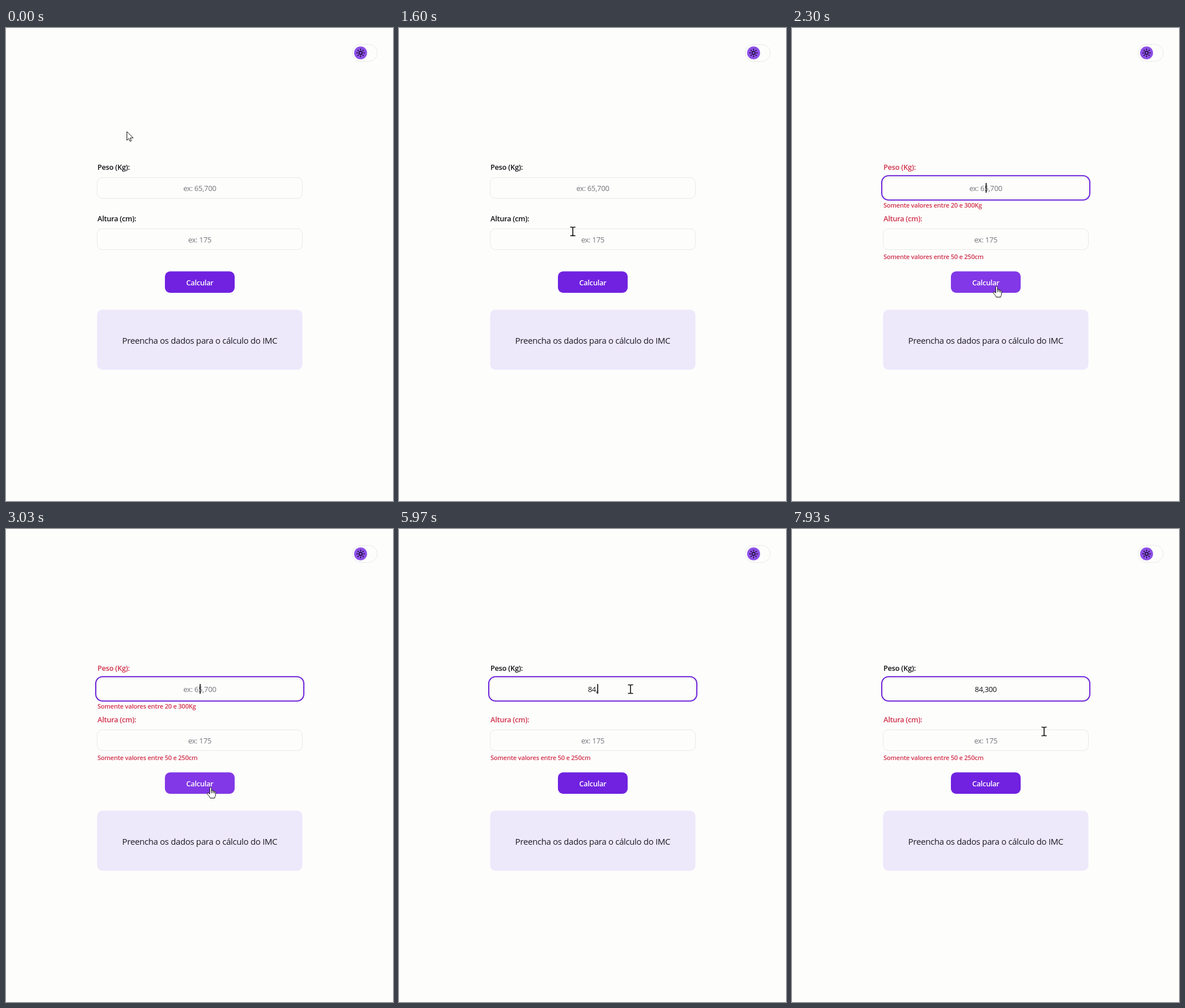
An HTML page that plays this animation: 677 px wide and 827 px high, repeating every 8 s.

```html
<!DOCTYPE html>
<html lang="pt">
<head>
<meta charset="utf-8">
<title>IMC</title>
<style>
  html, body { margin: 0; width: 100%; height: 100%; overflow: hidden; background: #fdfdfc; }
  svg { display: block; }
  text { font: 12.85px "Open Sans", "Noto Sans", sans-serif; letter-spacing: -0.02em; fill: #101014; }
  .label, .error, .action { font-weight: 600; }
  .label, .action { font-size: 12.7px; }
  .error { font-size: 11px; }
  .error, .label.invalid { fill: #d0314b; }
  .middle { text-anchor: middle; }
  .hint { fill: #74747b; }
  .message { font-size: 14.8px; fill: #1a1a22; }
  .action { fill: #fff; }
  .box { fill: #fdfdfc; stroke: #e9e9e6; }
  .pointer { fill: #fff; stroke: #111; stroke-linejoin: round; stroke-linecap: round; }
</style>
</head>
<body>
<svg width="677" height="827" viewBox="0 0 677 827">
  <rect class="box" x="605.5" y="28.5" width="44" height="30" rx="15"/>
  <circle cx="620.3" cy="43.5" r="11.3" fill="#8c4fe6"/>
  <g id="sun" transform="translate(620.3 43.5)" fill="none" stroke="#0c0818" stroke-width="1.4" stroke-linecap="round">
    <circle r="2.8"/>
  </g>

  <text id="weightLabel" class="label" x="160" y="248">Peso (Kg):</text>
  <rect class="box" x="159.5" y="261.5" width="359" height="36.5" rx="9"/>
  <rect id="ring" x="157" y="258.2" width="364" height="42.6" rx="12" fill="none" stroke="#6d23da" stroke-width="2"/>
  <text id="weight" class="middle" x="339" y="285"></text>
  <rect id="caret" y="271" width="1.6" height="17"/>
  <text id="weightError" class="error" x="160" y="314.3">Somente valores entre 20 e 300Kg</text>

  <text id="heightLabel" class="label" x="160" y="338">Altura (cm):</text>
  <rect class="box" x="159.5" y="351" width="359" height="36.5" rx="9"/>
  <text class="middle hint" x="339" y="375">ex: 175</text>
  <text id="heightError" class="error" x="160" y="404.3">Somente valores entre 50 e 250cm</text>

  <rect id="button" x="278" y="425.5" width="122" height="37.5" rx="9"/>
  <text class="middle action" x="339" y="449.5">Calcular</text>
  <rect x="159.5" y="492.5" width="359" height="105" rx="9" fill="#eee8fb"/>
  <text class="middle message" x="339" y="551.5">Preencha os dados para o cálculo do IMC</text>

  <g id="cursor">
    <path id="arrow" class="pointer" d="M.5 .5V15.3L3.9 12.1 6.1 17.2 8.4 16.2 6.2 11.2H11.1Z"/>
    <path id="hand" class="pointer" d="M-1.6 12V2.2C-1.6 .2 1.4 .2 1.4 2.2V7.5 6.6C1.8 5.3 4 5.6 4.1 7V8 7.5C4.5 6.4 6.4 6.7 6.5 8V9 8.5C7 7.6 8.7 8 8.7 9.3V13.5C8.7 15.8 7.3 16.8 7 19.5H-.8C-1.3 16.8-4.6 14.6-6 11.8-6.4 10.4-4.4 9.9-3.4 10.7ZM1.4 7.5V10.5M4.1 8V10.5M6.5 9V11"/>
    <path id="beam" d="M-4.5-7.5H-1.5Q0-7.5 0-6Q0-7.5 1.5-7.5H4.5M0-6V6M-4.5 7.5H-1.5Q0 7.5 0 6Q0 7.5 1.5 7.5H4.5" fill="none" stroke="#111" stroke-width="1.6"/>
  </g>
</svg>
<script>
const LOOP = 8000;
const el = id => document.getElementById(id);
const show = (id, on) => { el(id).style.display = on ? '' : 'none'; };
const clamp = v => Math.min(1, Math.max(0, v));
const progress = (t, from, to) => clamp((t - from) / (to - from));
const lerp = (a, b, k) => a + (b - a) * k;
const smooth = k => k * k * (3 - 2 * k);

// time, x, y of the pointer hotspot
const path = [
  [0, 211, 181], [1200, 211, 181], [1880, 358, 457], [1920, 358, 457], [2000, 358, 451],
  [3690, 358, 451], [3750, 405, 280], [7929, 405, 280], [7930, 441, 354], [LOOP, 441, 354]
];
const typing = [[5970, '84,'], [6570, '84,3'], [6900, '84,30'], [6970, '84,300']];

for (let i = 0; i < 8; i++) {
  const ray = document.createElementNS('http://www.w3.org/2000/svg', 'path');
  ray.setAttribute('d', 'M0-5.3V-6.7');
  ray.setAttribute('transform', `rotate(${i * 45})`);
  el('sun').append(ray);
}

function pointerAt(t) {
  const i = path.findIndex(p => p[0] > t);
  const [t0, x0, y0] = path[i - 1], [t1, x1, y1] = path[i];
  const k = smooth(progress(t, t0, t1));
  return [lerp(x0, x1, k), lerp(y0, y1, k)];
}

function pointerShape(x, y) {
  const inside = (l, t, r, b) => x >= l && x <= r && y >= t && y <= b;
  if (inside(278, 425, 400, 463)) return 'hand';
  if (inside(159, 261, 519, 298) || inside(159, 350, 519, 388)) return 'beam';
  return 'arrow';
}

function render(t) {
  const submitted = t >= 2300;
  const typed = typing.reduce((text, [at, value]) => t >= at ? value : text, '');
  const weightInvalid = submitted && !typed;

  const weight = el('weight');
  const content = typed || 'ex: 65,700';
  if (weight.textContent !== content) weight.textContent = content;
  weight.classList.toggle('hint', !typed);
  el('caret').setAttribute('x', 338.8 + (typed ? weight.getComputedTextLength() / 2 - 0.6 : 0));

  show('ring', submitted);
  show('caret', submitted && t < 5170 || t >= 5970 && t < 7030);
  show('weightError', weightInvalid);
  show('heightError', submitted);
  el('weightLabel').classList.toggle('invalid', weightInvalid);
  el('heightLabel').classList.toggle('invalid', submitted);

  const hover = progress(t, 1880, 2030) - progress(t, 3700, 3770);
  const [r, g, b] = [[112, 34, 224], [130, 56, 230]][0].map((c, i) => lerp(c, [130, 56, 230][i], hover));
  el('button').setAttribute('fill', `rgb(${r}, ${g}, ${b})`);

  const [x, y] = pointerAt(t);
  // the beam rests on its field at the end of the loop
  const shape = pointerShape(x, y);
  el('cursor').setAttribute('transform', `translate(${x} ${y})`);
  for (const id of ['arrow', 'hand', 'beam']) show(id, id === shape);
}

const start = performance.now();
function tick(now) {
  render(Math.max(0, now - start) % LOOP);
  requestAnimationFrame(tick);
}
render(0);
requestAnimationFrame(tick);
</script>
</body>
</html>
```
